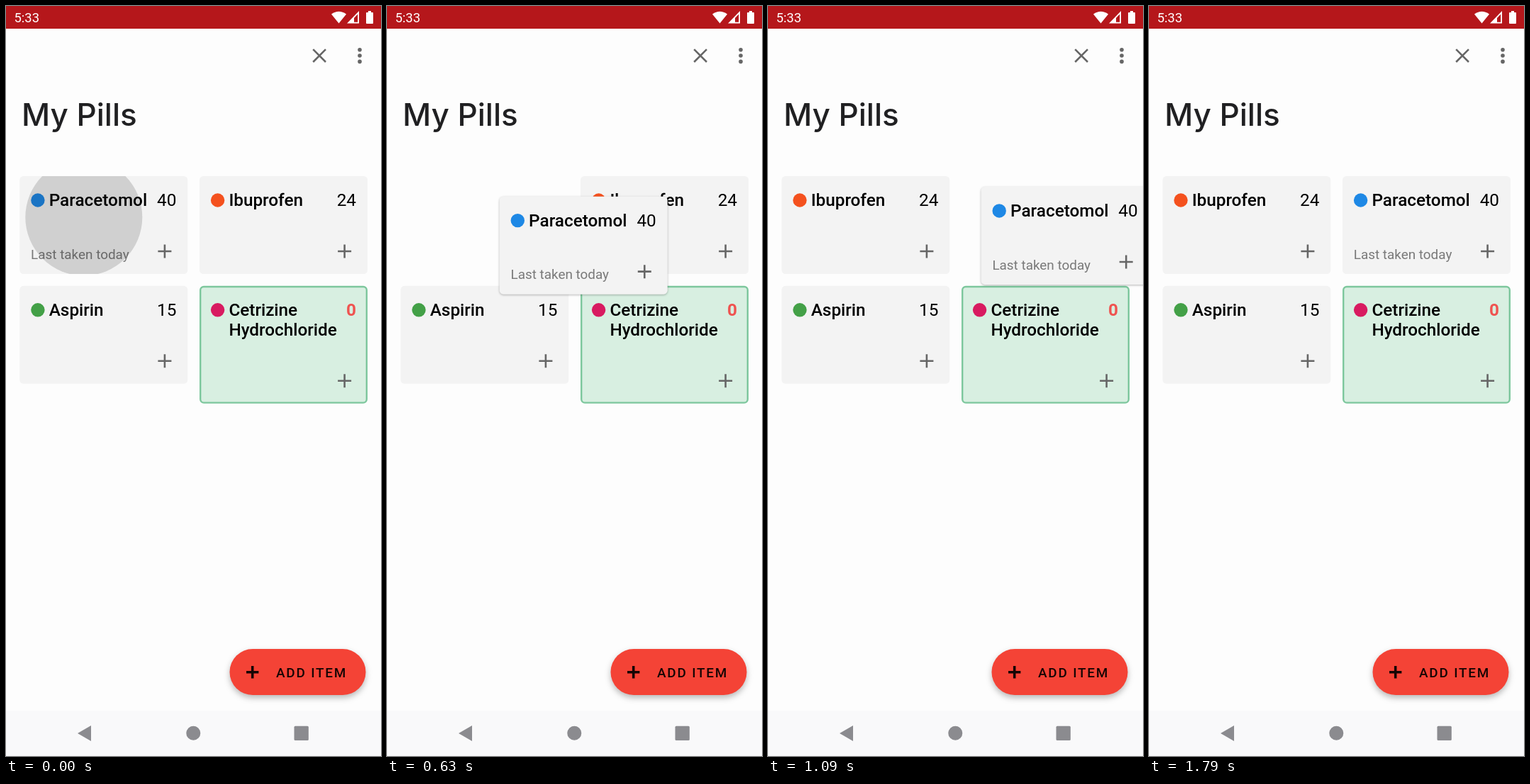
An HTML page that plays this animation: 529x1058 px, repeating every 4430 ms.

```html
<!DOCTYPE html>
<html lang="en">
<head>
<meta charset="utf-8">
<title>My Pills</title>
<style>
  html, body { margin: 0; width: 100%; height: 100%; overflow: hidden; background: #fdfdfd; }
  svg { display: block; width: 100vw; height: 100vh; font-family: Roboto, sans-serif; }
  .name { font-size: 24.3px; font-weight: 500; }
  .count { font-size: 24.3px; text-anchor: end; }
  .zero { font-weight: 700; fill: #ef5350; }
  .note { font-size: 18.9px; fill: #797979; }
  .line { fill: none; stroke: #666; stroke-width: 2.6; }
</style>
</head>
<body>
<svg viewBox="0 0 529 1058" preserveAspectRatio="none">
  <defs>
    <clipPath id="cardClip"><rect width="237" height="138" rx="5.4"/></clipPath>
  </defs>
  <rect width="529" height="1058" fill="#fdfdfd"/>

  <rect width="529" height="32" fill="#b5171b"/>
  <text x="11.5" y="23.3" font-size="18.4" fill="#fff">5:33</text>
  <g fill="#fff">
    <path d="M469.5 24.5L459 11.5Q469.5 4 480 11.5Z"/>
    <path d="M498 7V24.5H481ZM496.2 11.6L491 17V22.7H496.2Z" fill-rule="evenodd"/>
    <path d="M511 7H515V9H517Q518 9 518 10V24Q518 25 517 25H509Q508 25 508 24V10Q508 9 509 9H511Z"/>
  </g>

  <path class="line" d="M433.2 61.2L451 79M451 61.2L433.2 79"/>
  <g fill="#666">
    <circle cx="499" cy="61.7" r="2.8"/>
    <circle cx="499" cy="70" r="2.8"/>
    <circle cx="499" cy="78.4" r="2.8"/>
  </g>
  <text x="22" y="169" font-size="44" font-weight="500" fill="#202022" style="font-family: Inter, sans-serif">My Pills</text>

  <g id="cards"></g>

  <rect x="315.5" y="907" width="192" height="65" rx="32.5" fill="#f44336"
        style="filter: drop-shadow(0 4px 4px rgba(0,0,0,.27))"/>
  <path d="M339 939.7H356.4M347.7 931V948.4" stroke="#160504" stroke-width="3.6"/>
  <text x="381" y="947" font-size="18.9" font-weight="500" letter-spacing="1.8" fill="#160504">ADD ITEM</text>

  <rect y="994" width="529" height="64" fill="#f9f9fa"/>
  <g fill="#8b8b8f">
    <path d="M101 1026L120 1015V1037Z"/>
    <circle cx="264.3" cy="1025.8" r="10"/>
    <rect x="406.5" y="1015.7" width="20.3" height="20.3" rx="1.5"/>
  </g>
</svg>
<script>
const LOOP = 4430, FRAME = 1000 / 24, LAST = 43;
const LEFT = 19.3, RIGHT = 273, TOP = 240, ROW2 = 394.8;
const STRIDE = RIGHT - LEFT;

function cardMarkup({ id, dot, lines, count, note = '', empty = false }) {
  const h = empty ? 166 : 138;
  const box = empty
    ? `<rect x="1.2" y="1.2" width="234.6" height="${h - 2.4}" rx="4.8" fill="#d8efe1" stroke="#7dc79d" stroke-width="2.4"/>`
    : `<rect class="box" width="237" height="${h}" rx="5.4" fill="#f3f3f3"/>`;
  const names = lines.map((s, i) => `<text class="name" x="41.4" y="${42 + i * 28.6}">${s}</text>`).join('');
  return `<g id="${id}">${box}<circle cx="25.6" cy="34" r="9.7" fill="${dot}"/>${names}
    <text class="count${empty ? ' zero' : ''}" x="221" y="42">${count}</text>
    <text class="note" x="15.8" y="116.8">${note}</text>
    <path class="line" d="M195.1 ${h - 32}h19M204.6 ${h - 41.5}v19"/></g>`;
}

const $ = id => document.getElementById(id);
$('cards').innerHTML = [
  { id: 'ibuprofen', dot: '#f4511e', lines: ['Ibuprofen'], count: 24 },
  { id: 'aspirin', dot: '#43a047', lines: ['Aspirin'], count: 15 },
  { id: 'cetrizine', dot: '#d81b60', lines: ['Cetrizine', 'Hydrochloride'], count: 0, empty: true },
  { id: 'paracetomol', dot: '#1e88e5', lines: ['Paracetomol'], count: 40, note: 'Last taken today' }
].map(cardMarkup).join('');
$('paracetomol').insertAdjacentHTML('beforeend',
  '<g clip-path="url(#cardClip)"><circle id="ripple" cx="90.5" cy="58"/></g>');

const ripple = $('ripple'), dragBox = $('paracetomol').querySelector('.box');
const clamp = v => Math.max(0, Math.min(1, v));
const span = (t, a, b) => clamp((t - a) / (b - a));
const ease = p => (1 - Math.cos(Math.PI * p)) / 2;
const place = (id, x, y) => $(id).setAttribute('transform', `translate(${x.toFixed(2)} ${y.toFixed(2)})`);

// Drag offsets: time, dx, dy
const path = [
  [300, 0, 0], [420, 10.4, 4], [630, 142.8, 28.7], [780, 251, 27.5],
  [920, 283.4, 19.6], [1340, 276.8, 10.6], [1500, 276.5, 10], [1750, STRIDE, 0]
];

function slope(i, k) {
  if (i === 0 || i === path.length - 1) return 0;
  const rate = j => (path[j + 1][k] - path[j][k]) / (path[j + 1][0] - path[j][0]);
  const a = rate(i - 1), b = rate(i);
  return a * b > 0 ? 2 * a * b / (a + b) : 0;
}

// Monotone cubic through the drag points
function along(t, k) {
  const end = path.length - 1;
  if (t <= path[0][0]) return path[0][k];
  if (t >= path[end][0]) return path[end][k];
  const i = path.findIndex(p => p[0] > t) - 1;
  const [p, q] = [path[i], path[i + 1]];
  const d = q[0] - p[0], u = (t - p[0]) / d, v = 1 - u;
  return p[k] * v * v * (1 + 2 * u) + q[k] * u * u * (3 - 2 * u)
    + d * u * v * (slope(i, k) * v - slope(i + 1, k) * u);
}

function draw(ms) {
  const t = Math.min(LAST, Math.floor((ms + 4) / FRAME)) * FRAME;
  place('paracetomol', LEFT + along(t, 1), TOP + along(t, 2));
  place('ibuprofen', RIGHT - STRIDE * ease(span(t, 801, 1051)), TOP);

  const fade = 1 - span(t, 300, 520);
  ripple.setAttribute('r', 82.5 + 85 * span(t, 0, 170));
  ripple.setAttribute('opacity', ((0.145 + 0.065 * span(t, 0, 170)) * fade).toFixed(3));

  const lift = span(t, 400, 620) * (1 - span(t, 1500, 1750));
  dragBox.style.filter = lift ? `drop-shadow(0 1px 1.6px rgba(0,0,0,${(0.28 * lift).toFixed(3)}))` : 'none';
}

place('aspirin', LEFT, ROW2);
place('cetrizine', RIGHT, ROW2);
draw(0);
const start = performance.now();
function tick() {
  draw((performance.now() - start) % LOOP);
  requestAnimationFrame(tick);
}
requestAnimationFrame(tick);
</script>
</body>
</html>
```
